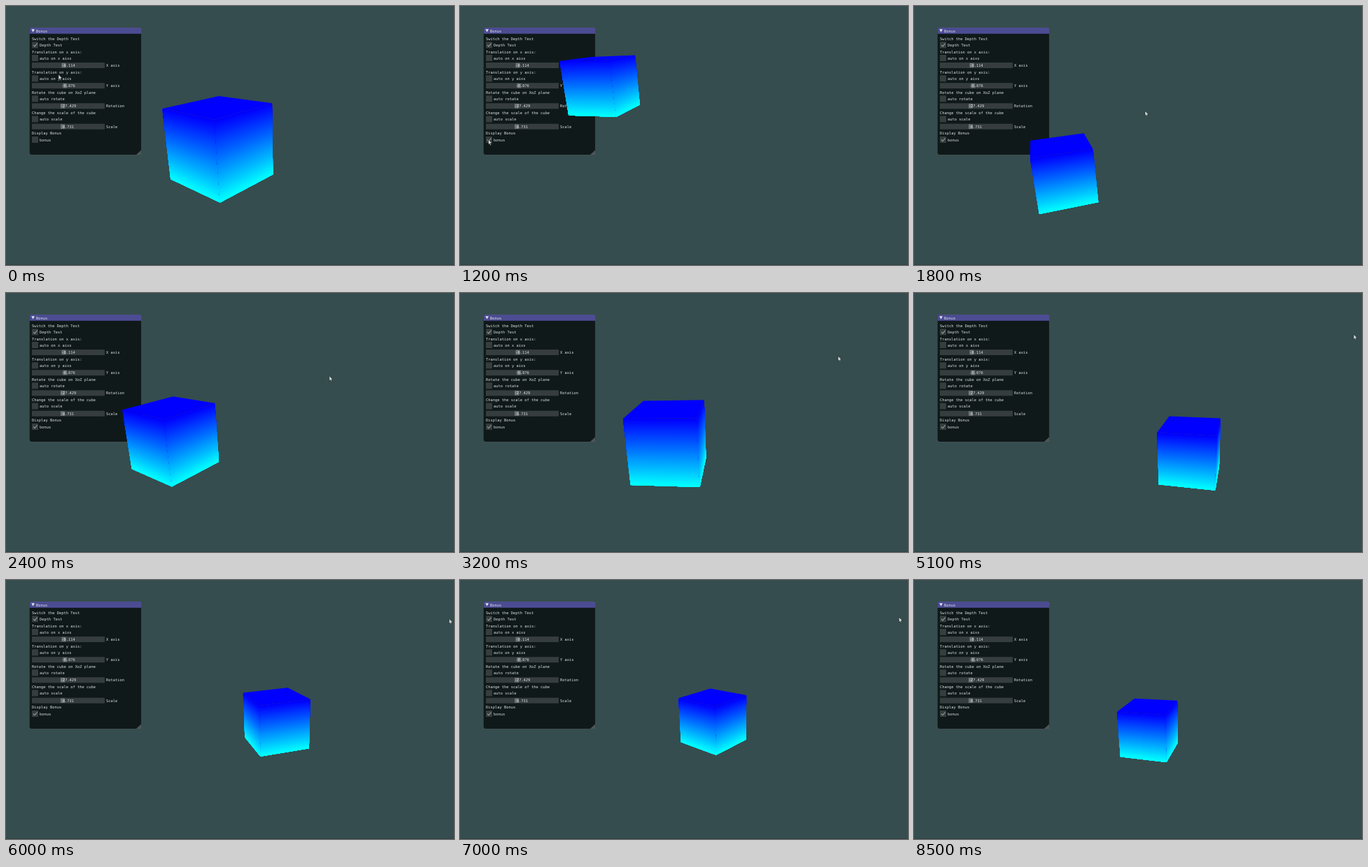
An HTML page with a canvas for the animation above (8700 ms loop, 640 px wide and 371 px high).

```html
<!DOCTYPE html>
<html lang="en">
<head>
<meta charset="utf-8">
<title>Bouncing cube</title>
<style>
  html, body { margin: 0; width: 100%; height: 100%; overflow: hidden; background: #354d4e; }
  svg, canvas { position: absolute; left: 0; top: 0; width: 640px; height: 371px; }
  text { font: 5.4px "DejaVu Sans Mono", monospace; fill: #dde1e1; }
</style>
</head>
<body>
<svg id="panel" viewBox="0 0 640 371"></svg>
<canvas id="stage" width="640" height="371"></canvas>
<script>
const LOOP = 8700, STEP = 100, LAST = 8500, BONUS_AT = 1100;

// ---- settings panel ----
const rect = (x, y, w, h, fill, rx = 0) =>
  `<rect x="${x}" y="${y}" width="${w}" height="${h}" rx="${rx}" fill="${fill}"/>`;
const label = (x, y, text, anchor = 'start') =>
  `<text x="${x}" y="${y + 2}" text-anchor="${anchor}">${text}</text>`;
const tick = (y, id = '') =>
  `<path ${id} d="M39 ${y}l2 2.2l3.6 -4.4" fill="none" stroke="#8b9292" stroke-width="1.2"/>`;
const checkbox = (y, text) => rect(37, y - 4.5, 9, 9, '#353d3e') + label(48, y, text);
const slider = (y, grab, value, text) =>
  rect(37, y - 4, 104, 8, '#353d3e') + rect(grab, y - 3.3, 6, 6.6, '#6b7373') +
  label(89, y, value, 'middle') + label(143, y, text);

document.getElementById('panel').innerHTML =
  rect(0, 370, 640, 1, '#2d4243') +
  rect(33, 30.5, 161, 183, '#465153', 3) +
  rect(33.6, 31, 159.6, 182, '#10191a', 3) +
  '<path d="M33.6 39.7V34q0-3 3-3H190.500q3 0 3 3V39.700z" fill="#4c4c93"/>' +
  '<path d="M36.300 33.200h4.600l-2.300 4.300z" fill="#e4e6ee"/>' +
  '<path d="M193 206.500V213H186z" fill="#4c5657"/>' +
  label(43, 35.5, 'Bonus') +
  label(37, 46.5, 'Switch the Depth Test') + checkbox(55.8, 'Depth Test') + tick(55.8) +
  label(37, 65.5, 'Translation on x axis:') + checkbox(74.5, 'auto on x aixs') +
  slider(85, 79.5, '-0.114', 'X axis') +
  label(37, 94.5, 'Translation on y axis:') + checkbox(103.8, 'auto on y aixs') +
  slider(114.2, 81.3, '-0.876', 'Y axis') +
  label(37, 123.7, 'Rotate the cube on XoZ plane') + checkbox(132.8, 'auto rotate') +
  slider(143.3, 78, '-27.429', 'Rotation') +
  label(37, 153, 'Change the scale of the cube') + checkbox(162, 'auto scale') +
  slider(172.7, 78, '0.731', 'Scale') +
  label(37, 182, 'Display Bonus') + checkbox(191.5, 'bonus') + tick(191.5, 'id="bonusTick"');

const bonusTick = document.getElementById('bonusTick');
const ctx = document.getElementById('stage').getContext('2d');

// ---- camera: pitched down, slightly rolled; world is [right, forward, down] ----
const FOCAL = 448, COS = 0.9537, SIN = 0.3007, ROLL = 0.054, ROLL_NORM = 0.9985;
function project([x, fwd, down]) {
  const z = fwd * COS + down * SIN;
  const u = FOCAL * x / z, v = FOCAL * (down * COS - fwd * SIN) / z;
  return [320 + (u + ROLL * v) * ROLL_NORM, 185.5 + (v - ROLL * u) * ROLL_NORM];
}

// ---- motion ----
// time (s), orbit radius, orbit angle, cube yaw (degrees)
const ORBIT = [
  [1.2, 1.57, 164.1, 27], [2.4, 1.326, 225.8, 94], [4.0, 1.127, 291.3, 155],
  [5.1, 0.98, 345.8, 206.5], [7.0, 0.895, 407.5, 268], [8.5, 0.687, 431.1, 294]
];
const CENTRE_FWD = 5.65, GROUND = 2.42;
// landing time (s), height of the bounce that follows
const BOUNCES = [
  [1.75, 0.87], [2.7, 0.75], [3.62, 0.66], [4.5, 0.39], [5.15, 0.33], [5.75, 0.28],
  [6.3, 0.24], [6.8, 0.18], [7.25, 0.1], [7.7, 0.05], [8.1, 0.02], [8.5, 0]
];
const CURSOR = [
  [0, 75, 98], [0.8, 44, 180], [1, 40.5, 191], [1.3, 40.5, 191], [1.8, 330, 150],
  [2.3, 461, 119], [2.7, 464, 117], [3.2, 540, 90], [3.6, 573, 78], [4, 607.5, 71],
  [4.5, 611, 69], [5.1, 628, 59], [5.4, 629, 58], [5.9, 635, 56], [6.3, 627, 53], [8.4, 627, 53]
];

function segment(keys, t) {
  let i = 0;
  while (i < keys.length - 2 && t >= keys[i + 1][0]) i++;
  return i;
}

function linear(keys, t, col) {
  const i = segment(keys, t), a = keys[i], b = keys[i + 1];
  return a[col] + (b[col] - a[col]) * (t - a[0]) / (b[0] - a[0]);
}

function smooth(keys, t, col) {
  const i = segment(keys, t), a = keys[i], b = keys[i + 1];
  const slope = k => {
    const p = keys[Math.max(k - 1, 0)], n = keys[Math.min(k + 1, keys.length - 1)];
    return (n[col] - p[col]) / (n[0] - p[0]);
  };
  const d = b[0] - a[0], s = (t - a[0]) / d, s2 = s * s, s3 = s2 * s;
  return a[col] * (2 * s3 - 3 * s2 + 1) + b[col] * (3 * s2 - 2 * s3) +
    d * (slope(i) * (s3 - 2 * s2 + s) + slope(i + 1) * (s3 - s2));
}

function height(t) {
  const first = BOUNCES[0][0], start = BONUS_AT / 1000;
  if (t < first) return 1.66 * (1 - ((t - start) / (first - start)) ** 2);
  const i = segment(BOUNCES, t), [a, peak] = BOUNCES[i];
  const s = (t - a) / (BOUNCES[i + 1][0] - a);
  return Math.max(0, 4 * peak * s * (1 - s));
}

function cubePose(t) {
  if (t * 1000 < BONUS_AT) return { x: -0.146, fwd: 3.96, down: 1.34, yaw: -1 };
  const r = smooth(ORBIT, t, 1), angle = smooth(ORBIT, t, 2) * Math.PI / 180;
  return {
    x: r * Math.cos(angle),
    fwd: CENTRE_FWD + r * Math.sin(angle),
    down: GROUND - height(t),
    yaw: smooth(ORBIT, t, 3)
  };
}

// ---- drawing ----
function fillShape(points, fill) {
  ctx.beginPath();
  points.forEach(p => ctx.lineTo(...p));
  ctx.closePath();
  ctx.fillStyle = fill;
  ctx.fill();
}

function drawCube({ x, fwd, down, yaw }) {
  const corners = [0, 1, 2, 3].map(k => {
    const a = (yaw + 90 * k) * Math.PI / 180;
    return [x + Math.SQRT1_2 * Math.cos(a), fwd + Math.SQRT1_2 * Math.sin(a)];
  });
  const at = (corner, level) => project([...corner, down - 0.5 + level]);
  if (down > 0.5) fillShape(corners.map(c => at(c, 0)), '#00f');
  corners.forEach((a, k) => {
    const b = corners[(k + 1) % 4];
    const mx = (a[0] + b[0]) / 2, mf = (a[1] + b[1]) / 2;
    if ((mx - x) * mx + (mf - fwd) * mf >= 0) return;
    // each band reaches the bottom edge, so no seams show between bands
    const bands = 64;
    for (let i = 0; i < bands; i++) {
      const green = Math.round(255 * i / (bands - 1));
      fillShape([at(a, i / bands), at(b, i / bands), at(b, 1), at(a, 1)], `rgb(0,${green},255)`);
    }
  });
}

function drawCursor(x, y) {
  const arrow = [[0, 0], [0, 7.6], [1.7, 6.1], [2.9, 8.8], [4.1, 8.3], [3, 5.7], [5.2, 5.5]];
  fillShape(arrow.map(([dx, dy]) => [x + dx, y + dy]), '#d5dada');
  ctx.strokeStyle = '#1c292a';
  ctx.lineWidth = 0.7;
  ctx.stroke();
}

function render(now) {
  const ms = Math.min(Math.floor(now % LOOP / STEP) * STEP, LAST), t = ms / 1000;
  ctx.clearRect(0, 0, 640, 371);
  bonusTick.style.visibility = ms >= BONUS_AT ? 'visible' : 'hidden';
  drawCube(cubePose(t));
  if (ms < 8400) drawCursor(linear(CURSOR, t, 1), linear(CURSOR, t, 2));
}

const begin = performance.now();
function loop() {
  render(performance.now() - begin);
  requestAnimationFrame(loop);
}
loop();
</script>
</body>
</html>
```
